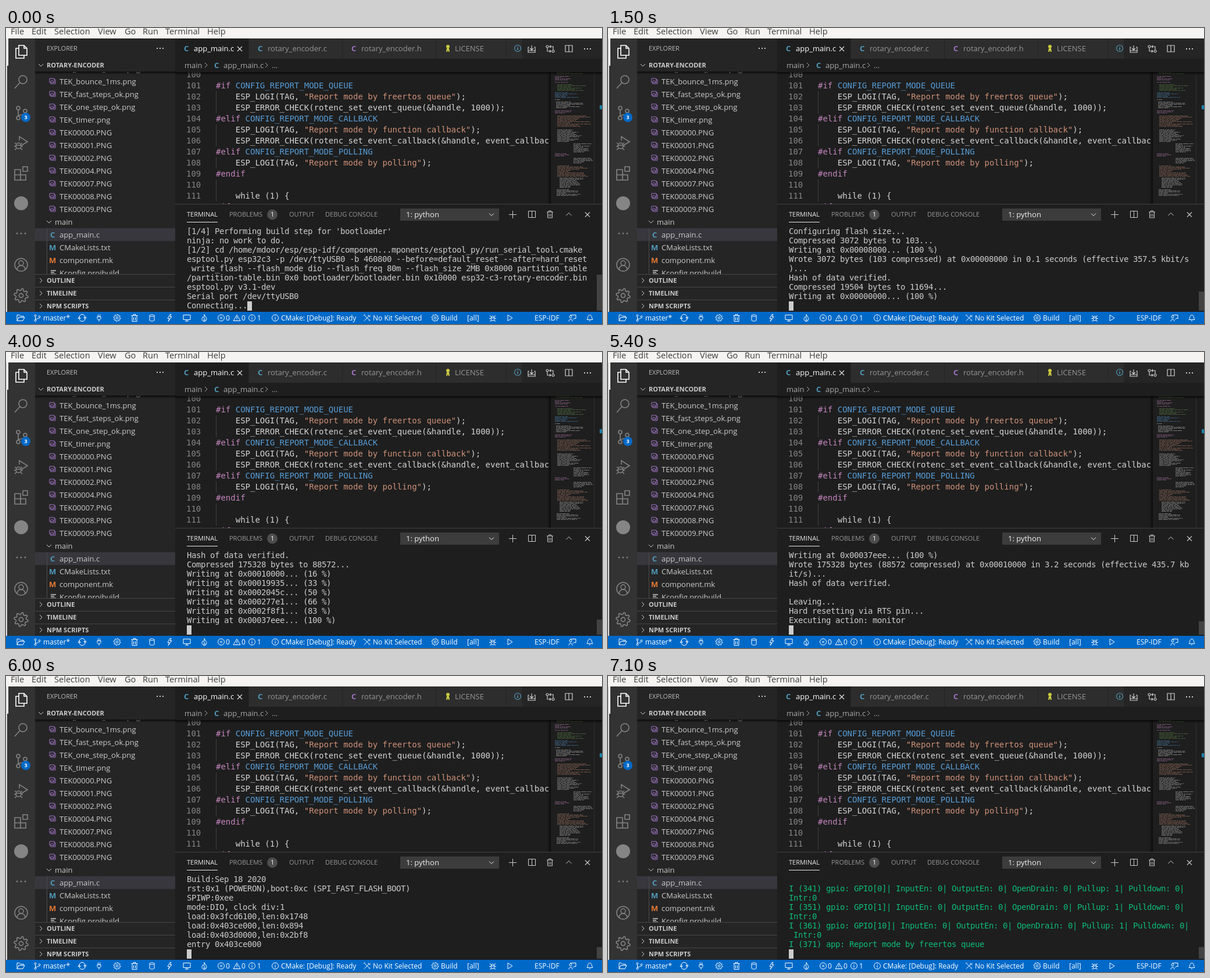
Recreate the animation shown at these times as an HTML page with a canvas. Size 1025 by 510 pixels, loop 8000 ms.

```html
<!DOCTYPE html>
<html lang="en">
<head>
<meta charset="utf-8">
<title>Flash and monitor</title>
<style>
html, body { margin: 0; width: 100%; height: 100%; overflow: hidden; background: #1e1e1e; }
canvas { display: block; }
</style>
</head>
<body>
<canvas id="stage" width="1025" height="510"></canvas>
<script>
const ctx = document.getElementById('stage').getContext('2d');
const UI = '"Open Sans", "Noto Sans", sans-serif';
const MONO = '14px "DejaVu Sans Mono", monospace';
const BLUE = '#0069c8', FG = '#cccccc', DIM = '#858585';
const C_BLUE = '#519aba', C_PURPLE = '#a074c4', C_ORANGE = '#e37933';

// ---- helpers ----
function rect(x, y, w, h, color) {
  ctx.fillStyle = color;
  ctx.fillRect(x, y, w, h);
}
function text(s, x, cy, size = 13, color = FG, weight = '') {
  ctx.font = `${weight} ${size}px ${UI}`;
  ctx.fillStyle = color;
  ctx.fillText(s, x, Math.round(cy + size * 0.36));
}
function mono(s, x, y, color) {
  ctx.font = MONO;
  ctx.fillStyle = color;
  ctx.fillText(s, x, y);
}
function icon(d, x, y, color = FG, width = 1, fill = false) {
  ctx.save();
  ctx.translate(x, y);
  ctx.lineWidth = width;
  ctx.strokeStyle = ctx.fillStyle = color;
  const path = new Path2D(d);
  fill ? ctx.fill(path) : ctx.stroke(path);
  ctx.restore();
}
function disc(x, y, r, color) {
  ctx.beginPath();
  ctx.arc(x, y, r, 0, 7);
  ctx.fillStyle = color;
  ctx.fill();
}
function ring(x, y, r, color, width = 1) {
  ctx.beginPath();
  ctx.arc(x, y, r, 0, 7);
  ctx.strokeStyle = color;
  ctx.lineWidth = width;
  ctx.stroke();
}
function gear(x, y, r, color, width = 1) {
  ctx.beginPath();
  for (let i = 0; i < 32; i++) {
    const a = (i + 0.5) * Math.PI / 16, q = i % 4 < 2 ? r : r * 0.74;
    ctx.lineTo(x + q * Math.cos(a), y + q * Math.sin(a));
  }
  ctx.closePath();
  ctx.strokeStyle = color;
  ctx.lineWidth = width;
  ctx.stroke();
  ring(x, y, r * 0.3, color, width);
}
function dots(x, y, color, gap = 5, size = 2) {
  for (const k of [-1, 0, 1]) rect(x + k * gap - size / 2, y - size / 2, size, size, color);
}
function clip(x, y, w, h, draw) {
  ctx.save();
  ctx.beginPath();
  ctx.rect(x, y, w, h);
  ctx.clip();
  draw();
  ctx.restore();
}
function shadow(x, y, w) {
  const g = ctx.createLinearGradient(0, y, 0, y + 5);
  g.addColorStop(0, 'rgba(0,0,0,.7)');
  g.addColorStop(1, 'rgba(0,0,0,0)');
  rect(x, y, w, 5, g);
}

const I = {
  down: 'M-4-2L0 2L4-2',
  up: 'M-4.5 2L0-2.5L4.5 2',
  right: 'M-2-4L2 0L-2 4',
  close: 'M-4-4L4 4M4-4L-4 4',
  plus: 'M0-6.5V6.5M-6.5 0H6.5',
  split: 'M-6-5.5H6V5.5H-6ZM0-5.5V5.5',
  trash: 'M-5.5-4H5.5M-2-4V-6H2V-4M-4-4V6H4V-4M-1.5-1V4M1.5-1V4',
  files: 'M-4-11H5L10-6V6H-4ZM5-11V-6H10M-4-6H-9V11H5V6',
  search: 'M10-4A7 7 0 1 1-4-4A7 7 0 1 1 10-4M-2 1L-11 11',
  branch: 'M-2-8A3 3 0 1 1-8-8A3 3 0 1 1-2-8M-2 9A3 3 0 1 1-8 9A3 3 0 1 1-2 9M10-3A3 3 0 1 1 4-3A3 3 0 1 1 10-3M-5-5V6M7 0C7 5-4 2-5 6',
  debug: 'M-3-4V-11L11-2L1 4M0 5A4.5 5 0 1 1-9 5A4.5 5 0 1 1 0 5M-9 4H0M-11 0L-8 2M2 0L-1 2M-12 6H-9M0 6H3M-11 12L-8 9M2 12L-1 9',
  blocks: 'M-11-6H-1V3H8V12H-11ZM-1 3H-11M-1 3V12M3-11H11V-3H3Z',
  person: 'M4-3A4 4 0 1 1-4-3A4 4 0 1 1 4-3M-7 8C-6-1 6-1 7 8',
  image: 'M-5-5H3V2H-5ZM-3 2V4H5V-3H3M-4 1L-1-2L3 2',
  sync: 'M-5-1A5 5 0 0 1 5-1M5 1A5 5 0 0 1-5 1M3-1H7L5 2ZM-7 1H-3L-5-2Z',
  smallBranch: 'M-2-4A1.5 1.5 0 1 1-5-4A1.5 1.5 0 1 1-2-4M-2 4.5A1.5 1.5 0 1 1-5 4.5A1.5 1.5 0 1 1-2 4.5M5-2A1.5 1.5 0 1 1 2-2A1.5 1.5 0 1 1 5-2M-3.5-2.5V3M3.5-.5C3.5 2-3 1-3.5 3',
  folder: 'M-6 5V-5H-2L0-3H5V-1M-6 5L-3-1H7L4 5Z',
  plug: 'M-3-2H3V1C3 4-3 4-3 1ZM-1.5-2V-6M1.5-2V-6M0 3V6',
  db: 'M-4-4C-4-6 4-6 4-4V4C4 6-4 6-4 4ZM-4-4C-4-2 4-2 4-4',
  bolt: 'M1-6L-3 1H0L-2 6L4-2H1L3-6Z',
  screen: 'M-6-5H6V3H-6ZM-3 5.5H3M0 3V5.5',
  flame: 'M0-6C1-3 4-1 4 2C4 7-4 7-4 2C-4 0-3-1-2-2C-2 0-1 0 0-1C1-3-1-4 0-6M0 6C-2 4 0 3 0 1C2 3 2 5 0 6',
  warn: 'M0-5L6 5H-6ZM0-2V2M0 3V4',
  tools: 'M-5-5L5 5M-6-4L-4-6M3 5L5 3M5-5L-5 5M2-5C2-2 5-2 6-3',
  bug: 'M3 1A3 4 0 1 1-3 1A3 4 0 1 1 3 1M-3 0H3M-5-4L-2-2M5-4L2-2M-6 1H-3M3 1H6M-5 6L-2 4M5 6L2 4',
  play: 'M-3-5L5 0L-3 5Z',
  bell: 'M-5 3C-3 1-4-5 0-5C4-5 3 1 5 3ZM-1 5H1',
  feedback: 'M-1-2A2 2 0 1 1-5-2A2 2 0 1 1-1-2M-6 6C-6 1 0 1 0 6M-3-5H6V1H3L1 3',
  inbox: 'M-4-3H-6V6H6V-3H4M0-6V2M-3-1L0 2L3-1M-6 3H6',
  compare: 'M-3-4A2 2 0 1 1-7-4A2 2 0 1 1-3-4M7 4A2 2 0 1 1 3 4A2 2 0 1 1 7 4M-5-2V4H1M-1 2L1 4L-1 6M5 2V-4H-1M1-6L-1-4L1-2',
  info: 'M0-1V3M0-3V-2',
  license: 'M3-3A3 3 0 1 1-3-3A3 3 0 1 1 3-3M-2 0H2L3 6H1L0 3L-1 6H-3Z'
};

// ---- static parts ----
function drawMenu() {
  rect(0, 0, 1025, 18, '#f5f4f2');
  rect(0, 18, 2, 471, '#dcdcda');
  const menu = { File: 8, Edit: 44, Selection: 83, View: 158, Go: 204, Run: 235, Terminal: 274, Help: 346 };
  for (const [s, x] of Object.entries(menu)) text(s, x, 6, 14.6, '#3c3c3c');
}

function drawActivity() {
  rect(2, 18, 48, 471, '#333333');
  rect(2, 18, 2, 47, '#ffffff');
  icon(I.files, 26, 41, '#ffffff', 1.6);
  icon(I.search, 26, 93, DIM, 1.6);
  icon(I.debug, 26, 198, DIM, 1.5);
  icon(I.blocks, 26, 250, DIM, 1.6);
  disc(26, 302, 12, DIM);
  dots(26, 354, DIM, 7, 2.5);
  ring(26, 408, 11, DIM, 1.5);
  icon(I.person, 26, 408, DIM, 1.5);
  gear(26, 461, 12, DIM, 1.6);
}

function drawSidebar() {
  rect(50, 18, 241, 471, '#252526');
  text('EXPLORER', 70, 35, 11, '#bbbbbb');
  dots(265, 35, FG);
  rect(50, 345, 241, 22, '#37373d');
  rect(70, 345, 1, 79, '#4b4b4b');

  const images = ['TEK_bounce_10ms.png', 'TEK_bounce_1ms.png', 'TEK_fast_steps_ok.png', 'TEK_one_step_ok.png',
    'TEK_timer.png', ...[0, 1, 2, 4, 7, 8, 9].map(n => `TEK0000${n}.PNG`)];
  clip(50, 75, 241, 349, () => {
    images.forEach((s, i) => {
      icon(I.image, 80, 70 + 22 * i, C_PURPLE);
      text(s, 92, 70 + 22 * i);
    });
    icon(I.down, 74, 334);
    text('main', 84, 334);
    const files = [['app_main.c', 'C', C_BLUE], ['CMakeLists.txt', 'M', C_BLUE], ['component.mk', 'M', C_ORANGE], ['Kconfig.projbuild']];
    files.forEach(([name, mark, color], i) => {
      const y = 356 + 22 * i;
      if (mark) text(mark, mark === 'C' ? 76 : 74, y, 13, color, 'bold');
      else icon('M-3-4H6M-3-1H3M-3 2H6', 80, y, FG, 1.4);
      text(name, 92, y);
    });
  });
  shadow(50, 75, 241);

  icon(I.down, 60, 64);
  text('ROTARY-ENCODER', 70, 64, 11, FG, 'bold');
  ['OUTLINE', 'TIMELINE', 'NPM SCRIPTS'].forEach((s, i) => {
    const y = 435 + 22 * i;
    rect(50, y - 11, 241, 1, '#464647');
    icon(I.right, 60, y);
    text(s, 70, y, 11, FG, 'bold');
  });
}

function drawTabs() {
  rect(291, 18, 734, 35, '#252526');
  const tabs = [
    [291, 126, 'app_main.c', 'C', C_BLUE],
    [418, 160, 'rotary_encoder.c', 'C', C_BLUE],
    [579, 160, 'rotary_encoder.h', 'C', C_PURPLE],
    [740, 120, 'LICENSE'],
    [861, 26, '']
  ];
  tabs.forEach(([x, w, name, mark, color], i) => {
    rect(x, 18, w, 35, i ? '#2d2d2d' : '#1e1e1e');
    if (mark) text(mark, x + 15, 35, 13, color, 'bold');
    text(name, x + 32, 35, 13, i ? '#969696' : '#ffffff');
  });
  icon(I.close, 402, 36, '#e0e0e0', 1.2);
  icon(I.license, 760, 35, '#cbcb41', 1, true);
  clip(861, 18, 26, 35, () => {
    ring(880, 35, 5.5, C_BLUE, 1.2);
    icon(I.info, 880, 35, C_BLUE, 1.5);
  });
  icon(I.inbox, 904, 36, '#d0d0d0', 1.2);
  icon(I.compare, 936, 36, '#d0d0d0', 1.2);
  icon(I.split, 968, 35.5, '#d0d0d0', 1.2);
  dots(1000, 36, '#d0d0d0');

  const crumb = '#a9a9a9';
  text('main', 307, 64, 13, crumb);
  icon(I.right, 344, 64, crumb);
  text('C', 358, 64, 13, C_BLUE, 'bold');
  text('app_main.c', 374, 64, 13, crumb);
  icon(I.right, 448, 64, crumb);
  text('…', 457, 64, 13, crumb);
}

const code = `
#if CONFIG_REPORT_MODE_QUEUE
    ESP_LOGI(TAG, "Report mode by freertos queue");
    ESP_ERROR_CHECK(rotenc_set_event_queue(&handle, 1000));
#elif CONFIG_REPORT_MODE_CALLBACK
    ESP_LOGI(TAG, "Report mode by function callback");
    ESP_ERROR_CHECK(rotenc_set_event_callback(&handle, event_callback));
#elif CONFIG_REPORT_MODE_POLLING
    ESP_LOGI(TAG, "Report mode by polling");
#endif

    while (1) {
#if`.split('\n');

function drawCode() {
  code.forEach((line, i) => {
    const y = 85 + 19 * i;
    if (i < 12) mono(String(100 + i), 310, y, DIM);
    if (line[0] === ' ' || i === 10) rect(361, y - 14, 1, 19, '#404040');
    let x = 361;
    for (const part of line.split(/(#\w+|CONFIG_\w+|"[^"]*")/)) {
      const color = { '#': '#c586c0', C: '#569cd6', '"': '#ce9178' }[part[0]] || '#d4d4d4';
      mono(part, x, y, color);
      x += ctx.measureText(part).width;
    }
  });
}

// Minimap blocks: top, bottom, indent, longest line, colour
const minimap = [
  [76, 80, 3, 64, '#6a9955'], [83, 90, 0, 28, '#c586c0'], [93, 94, 0, 24, '#c586c0'],
  [97, 108, 4, 60, '#6a9955'], [111, 120, 0, 44, '#569cd6'], [123, 124, 0, 22, '#d4d4d4'],
  [127, 139, 2, 50, '#d4d4d4'], [142, 148, 0, 30, '#c586c0'], [151, 170, 4, 60, '#ce9178'],
  [175, 197, 4, 42, '#d4d4d4'], [199, 214, 32, 36, '#d4d4d4'], [216, 222, 0, 40, '#c586c0'],
  [224, 234, 32, 34, '#d4d4d4'], [237, 256, 4, 54, '#ce9178'], [258, 276, 8, 46, '#d4d4d4'],
  [278, 290, 3, 44, '#d4d4d4']
];
function drawMinimap() {
  let seed = 7;
  const rand = () => (seed = (seed * 16807) % 2147483647) / 2147483647;
  const g = ctx.createLinearGradient(931, 0, 937, 0);
  g.addColorStop(0, 'rgba(0,0,0,0)');
  g.addColorStop(1, 'rgba(0,0,0,.6)');
  rect(931, 76, 6, 228, g);
  rect(937, 76, 74, 228, '#1e1e1e');
  ctx.globalAlpha = 0.5;
  for (const [top, bottom, indent, max, color] of minimap) {
    for (let y = top; y < bottom; y += 2) {
      const end = max * (0.35 + 0.65 * rand());
      for (let x = 0; x < end;) {
        const w = 2 + Math.floor(rand() * 8);
        rect(944 + indent + x, y, Math.min(w, end - x), 1, color);
        x += w + 1;
      }
    }
  }
  ctx.globalAlpha = 1;
  rect(1011, 76, 1, 228, '#2f2f2f');
  rect(1021, 133, 4, 7, '#1b81a8');
}

function drawEditor() {
  rect(291, 53, 734, 436, '#1e1e1e');
  drawTabs();
  clip(291, 76, 643, 228, drawCode);
  clip(931, 76, 94, 228, drawMinimap);
  shadow(291, 76, 734);
}

function drawPanelHeader() {
  rect(291, 303, 734, 1, '#414141');
  text('TERMINAL', 311, 321, 11, '#e7e7e7');
  rect(311, 334, 53, 1, '#e7e7e7');
  text('PROBLEMS', 384, 321, 11, '#979797');
  disc(458, 321.5, 9, '#4d4d4d');
  text('1', 455, 321, 11, '#ffffff');
  text('OUTPUT', 487, 321, 11, '#979797');
  text('DEBUG CONSOLE', 549, 321, 11, '#979797');
  rect(678, 311, 170, 21, '#3c3c3c');
  text('1: python', 688, 321, 13, '#f0f0f0');
  icon(I.down, 835, 321.5, '#f0f0f0');
  icon(I.plus, 871.5, 321.5);
  icon(I.split, 904.5, 321);
  icon(I.trash, 935.5, 321);
  icon(I.up, 968, 321);
  icon(I.close, 1000, 321.5, FG, 1.1);
}

function drawStatus() {
  rect(0, 489, 1025, 21, BLUE);
  const y = 499.5, white = '#ffffff';
  const icons = {
    folder: 25, smallBranch: 54, sync: 131, plug: 160, trash: 221, db: 251, bolt: 281, screen: 311,
    flame: 341, warn: 397, tools: 621, bug: 837, play: 866, feedback: 974, bell: 1004
  };
  for (const [name, x] of Object.entries(icons)) icon(I[name], x, y, white);
  gear(191, y, 6, white);
  gear(738, y, 6, white);
  for (const x of [370, 423, 463]) {
    ring(x, y, 5.5, white);
    icon(x === 370 ? 'M-2-2L2 2M2-2L-2 2' : I.info, x, y, white);
  }
  const labels = {
    64: 'master*', 378: '0', 405: '0', 432: '1', 473: 'CMake: [Debug]: Ready',
    631: 'No Kit Selected', 748: 'Build', 793: '[all]', 909: 'ESP-IDF'
  };
  for (const [x, s] of Object.entries(labels)) text(s, +x, y, 12, white);
}

// ---- terminal ----
const COLS = 86, ROWS = 9, CELL = 8, LINE = 16, LEFT = 311, TOP = 343, HIDDEN = 12;
const gpio = (ms, n) =>
  `I (${ms}) gpio: GPIO[${n}]| InputEn: 0| OutputEn: 0| OpenDrain: 0| Pullup: 1| Pulldown: 0| Intr:0\n`;
const writing = (addr, pct) => `Writing at 0x${addr}... (${pct} %)\n`;

const output = [
  [0, `[1/4] Performing build step for 'bootloader'
ninja: no work to do.
[1/2] cd /home/mdoor/esp/esp-idf/componen...mponents/esptool_py/run_serial_tool.cmake
esptool.py esp32c3 -p /dev/ttyUSB0 -b 460800 --before=default_reset --after=hard_reset write_flash --flash_mode dio --flash_freq 80m --flash_size 2MB 0x8000 partition_table/partition-table.bin 0x0 bootloader/bootloader.bin 0x10000 esp32-c3-rotary-encoder.bin
esptool.py v3.1-dev
Serial port /dev/ttyUSB0
Connecting...`],
  [200, '.'],
  [700, `
Chip is ESP32-C3 (revision 2)
Features: Wi-Fi
Crystal is 40MHz
MAC: 02:00:00:00:00:01
Uploading stub...
Running stub...
`],
  [800, `Stub running...
Changing baud rate to 460800
Changed.
Configuring flash size...
Compressed 3072 bytes to 103...
${writing('00008000', 100)}Wrote 3072 bytes (103 compressed) at 0x00008000 in 0.1 seconds (effective 357.5 kbit/s)...
Hash of data verified.
Compressed 19504 bytes to 11694...
${writing('00000000', 100)}`],
  [1900, `Wrote 19504 bytes (11694 compressed) at 0x00000000 in 0.6 seconds (effective 255.1 kbit/s)...
Hash of data verified.
Compressed 175328 bytes to 88572...
${writing('00010000', 16)}`],
  [2700, writing('00019935', 33) + writing('0002045c', 50)],
  [3200, writing('000277e1', 66)],
  [4000, writing('0002f8f1', 83) + writing('00037eee', 100)],
  [5400, `Wrote 175328 bytes (88572 compressed) at 0x00010000 in 3.2 seconds (effective 435.7 kbit/s)...
Hash of data verified.

Leaving...
Hard resetting via RTS pin...
Executing action: monitor
`],
  [5500, `Running idf_monitor in directory /home/mdoor/esp/rotary-encoder
Executing "python /home/mdoor/esp/esp-idf/tools/idf_monitor.py -p /dev/ttyUSB0 -b 115200 --toolchain-prefix riscv32-esp-elf- build/esp32-c3-rotary-encoder.elf"...
`],
  [5700, '--- idf_monitor on /dev/ttyUSB0 115200 ---\n'],
  [5800, '--- Quit: Ctrl+] | Menu: Ctrl+T | Help: Ctrl+T followed by Ctrl+H ---\nESP-ROM:esp32c3-20200918\n'],
  [5900, `Build:Sep 18 2020
rst:0x1 (POWERON),boot:0xc (SPI_FAST_FLASH_BOOT)
SPIWP:0xee
mode:DIO, clock div:1
`],
  [6000, `load:0x3fcd6100,len:0x1748
load:0x403ce000,len:0x894
load:0x403d0000,len:0x2bf8
entry 0x403ce000
`],
  [6100, `I (48) boot: ESP-IDF v4.3-beta1 2nd stage bootloader
I (48) boot: chip revision: 2
I (51) boot.esp32c3: SPI Speed      : 80MHz
I (55) boot.esp32c3: SPI Mode       : DIO
I (60) boot.esp32c3: SPI Flash Size : 2MB
I (65) boot: Enabling RNG early entropy source...
I (70) boot: Partition Table:
I (74) boot: ## Label            Usage          Type ST Offset   Length
`],
  [6200, `I (168) boot: Loaded app from partition at offset 0x10000
I (171) boot: Disabling RNG early entropy source...
I (187) cpu_start: Pro cpu up.
I (263) cpu_start: Pro cpu start user code
I (263) cpu_start: cpu freq: 160000000
I (310) heap_init: Initializing. RAM available for dynamic allocation:
I (325) spi_flash: flash io: dio
I (331) cpu_start: Starting scheduler.
`],
  [6300, '\n' + gpio(341, 0) + gpio(351, 1) + gpio(361, 10) + 'I (371) app: Report mode by freertos queue\n']
];

function lineColor(line) {
  if (line.startsWith('I (')) return '#0dbc79';
  return line.startsWith('--- ') ? '#e5e510' : FG;
}
function wrap(log) {
  return log.split('\n').flatMap(line => {
    const color = lineColor(line), rows = [];
    for (let i = 0; i === 0 || i < line.length; i += COLS) rows.push([line.slice(i, i + COLS), color]);
    return rows;
  });
}
function drawTerminal(t) {
  rect(291, 340, 734, 149, '#1e1e1e');
  const rows = wrap(output.filter(([at]) => at <= t).map(o => o[1]).join(''));
  const view = rows.slice(-ROWS);
  view.forEach(([s, color], r) => {
    for (let i = 0; i < s.length; i++) mono(s[i], LEFT + i * CELL, TOP + 12 + r * LINE, color);
  });
  rect(LEFT + view[ROWS - 1][0].length * CELL, TOP + (ROWS - 1) * LINE, CELL, LINE, FG);
  const track = ROWS * LINE;
  const thumb = Math.max(20, Math.round(track * ROWS / (rows.length + HIDDEN)));
  rect(1016, TOP + track - thumb, 9, thumb, '#424242');
}

// ---- source control badge ----
const badges = [[0, 'count'], [1200, 'clock'], [1500, 'count'], [6600, 'none'], [6800, 'clock'], [7100, 'count']];
function drawBadge(t) {
  rect(12, 130, 34, 36, '#333333');
  icon(I.branch, 26, 146, DIM, 1.6);
  const kind = badges.filter(([at]) => at <= t).pop()[1];
  if (kind === 'count') {
    disc(34, 154, 8, BLUE);
    text('3', 31.4, 154, 9, '#ffffff', 'bold');
  } else if (kind === 'clock') {
    disc(33.5, 154.5, 8.5, BLUE);
    ring(33.5, 154.5, 5.5, '#ffffff', 1.1);
    icon('M0-3.5V.5H3', 33.5, 154.5, '#ffffff', 1.1);
  }
}

// ---- run ----
const LOOP = 8000;
const changes = [...output, ...badges].map(c => c[0]);
const start = performance.now();
let shown = -1;

drawMenu();
drawActivity();
drawSidebar();
drawEditor();
drawPanelHeader();
drawStatus();

function tick() {
  const t = (performance.now() - start) % LOOP;
  const state = Math.max(...changes.filter(at => at <= t));
  if (state !== shown) {
    shown = state;
    drawTerminal(t);
    drawBadge(t);
  }
  requestAnimationFrame(tick);
}
tick();
</script>
</body>
</html>
```
